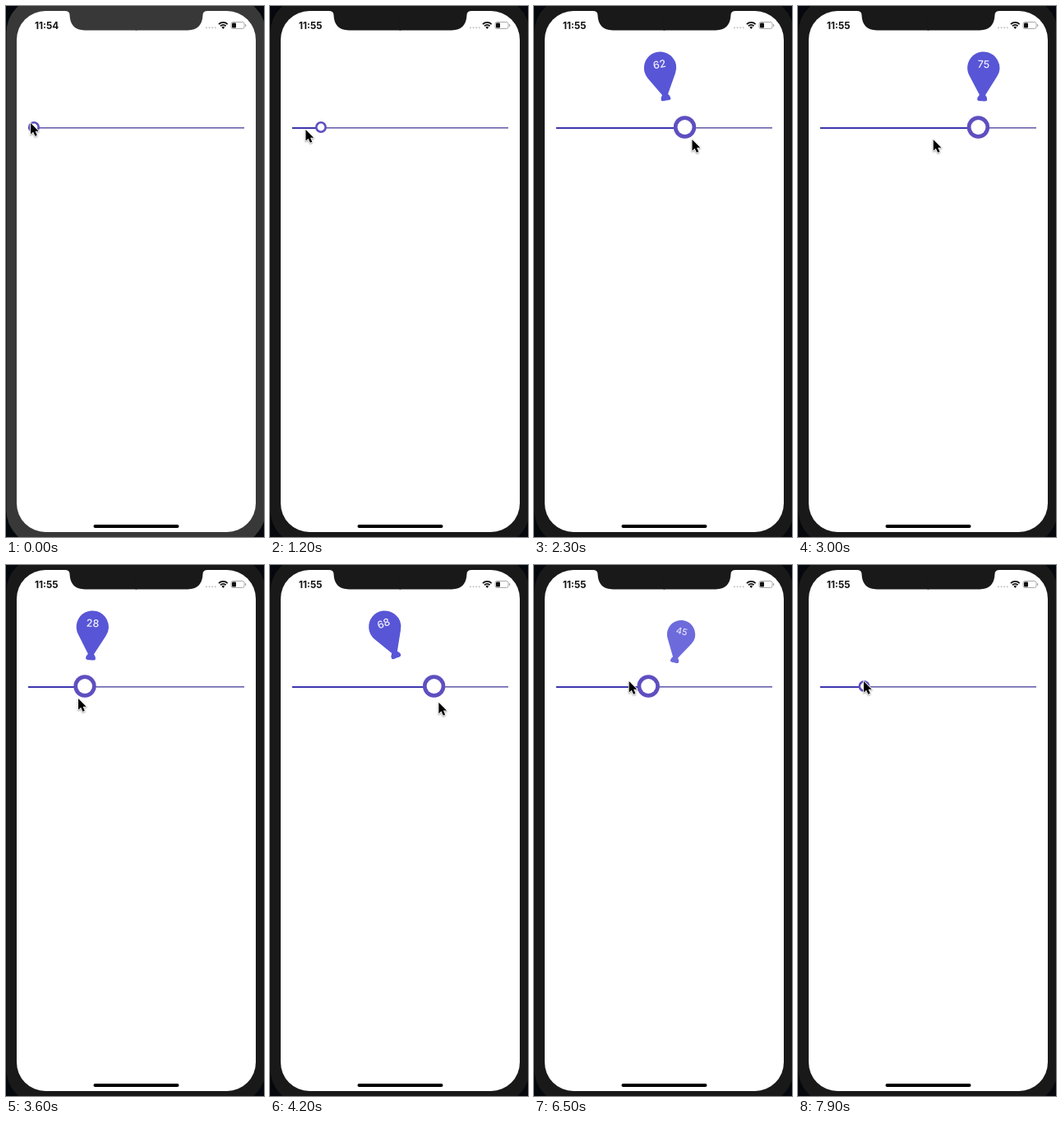
An HTML page with a canvas for the animation above (8 s loop, 314 by 644 pixels).

```html
<!DOCTYPE html>
<html lang="en">
<head>
<meta charset="utf-8">
<title>Balloon slider</title>
<style>
  html, body { margin: 0; width: 100%; height: 100%; overflow: hidden; background: #05080c; }
  canvas { display: block; width: 314px; height: 644px; }
</style>
</head>
<body>
<canvas id="stage"></canvas>
<script>
const W = 314, H = 644, LOOP = 8000, STEP = 100;
const TRACK_Y = 147, HEAD_Y = 75;
const INK = '#111';
const canvas = document.getElementById('stage');
const ratio = window.devicePixelRatio || 1;
canvas.width = W * ratio;
canvas.height = H * ratio;
const ctx = canvas.getContext('2d');

function ramp(t, from, to) {
  const u = Math.min(1, Math.max(0, (t - from) / (to - from)));
  return u * u * (3 - 2 * u);
}

const pulse = (t, inA, inB, outA, outB) => ramp(t, inA, inB) * (1 - ramp(t, outA, outB));

// Each move eases from wherever the last one ended: [start, end, target].
const glide = (t, from, ...moves) =>
  moves.reduce((pos, [start, end, to]) => pos + (to - pos) * ramp(t, start, end), from);

const thumbX = t => glide(t, 34,
  [1000, 1200, 62], [1670, 2670, 238], [2830, 3580, 96], [3620, 4340, 211], [6100, 6850, 80.5]);

const balloonX = t => glide(t, 70,
  [1800, 2800, 237], [2850, 3700, 100], [3900, 4650, 213], [6200, 7100, 82]);

const cursorX = t => glide(t, 30,
  [1000, 1200, 43.5], [1470, 2680, 238], [2680, 3330, 88], [3600, 4350, 219],
  [4600, 5900, 208], [6150, 6690, 79], [7000, 7300, 69], [7600, 7800, 80]);

const cursorY = t => glide(t, 142,
  [200, 400, 144.5], [1000, 1200, 150], [1300, 2200, 162], [3600, 4300, 167], [5400, 5900, 141]);

function box(x, y, w, h, r, fill) {
  ctx.beginPath();
  ctx.roundRect(x, y, w, h, r);
  ctx.fillStyle = fill;
  ctx.fill();
}

function disc(x, y, r, fill) {
  ctx.beginPath();
  ctx.arc(x, y, r, 0, Math.PI * 2);
  ctx.fillStyle = fill;
  ctx.fill();
}

function drawPhone(t) {
  const bezel = t < 600 ? '#383838' : t < 700 ? '#282828' : '#191919';
  ctx.fillStyle = '#05080c';
  ctx.fillRect(0, 0, W, H);
  box(0.5, -10, 315.5, 664, 42, bezel);
  box(13, 6, 291, 632, 35, '#fff');

  // Right half of the notch, drawn twice about its centre.
  const half = new Path2D('M-1 -1H87V0Q81 0 81 5C80.5 17 74.5 23.4 62.5 23.4H-1Z');
  ctx.fillStyle = bezel;
  for (const side of [-1, 1]) {
    ctx.save();
    ctx.translate(158.5, 6);
    ctx.scale(side, 1);
    ctx.fill(half);
    ctx.restore();
  }
  box(106.5, 629, 104, 4, 2, '#000');
}

function drawWifi(x, y) {
  const from = -Math.PI * 0.75, to = -Math.PI * 0.25;
  ctx.strokeStyle = ctx.fillStyle = INK;
  ctx.lineWidth = 1.8;
  for (const r of [4.6, 7.6]) {
    ctx.beginPath();
    ctx.arc(x, y, r, from, to);
    ctx.stroke();
  }
  ctx.beginPath();
  ctx.moveTo(x, y + 0.5);
  ctx.arc(x, y, 2.6, from, to);
  ctx.fill();
}

function drawStatus(t) {
  ctx.fillStyle = INK;
  ctx.font = '700 11.7px Inter, sans-serif';
  ctx.textAlign = 'left';
  ctx.fillText(t < 1100 ? '11:54' : '11:55', 35, 27.8);

  for (let i = 0; i < 4; i++) disc(244 + i * 3.6, 26.3, 1.1, '#c9c9c9');
  drawWifi(264.3, 27.5);

  ctx.beginPath();
  ctx.roundRect(274, 19.5, 16, 8, 2.2);
  ctx.strokeStyle = '#a8a8a8';
  ctx.lineWidth = 1;
  ctx.stroke();
  box(275, 20.5, 5, 6, 1, INK);
  box(291, 22, 1.2, 3, 0.6, '#a8a8a8');
}

function drawSlider(x, press) {
  const outer = 7 + 6.7 * press, ring = 2.6 + 2.1 * press;
  ctx.fillStyle = '#6962ac';
  ctx.fillRect(27, 147, 263, 1.6);
  ctx.fillStyle = '#3e38b0';
  ctx.fillRect(27, 147, x - 27, 2);
  disc(x, TRACK_Y, outer, '#5e4fc0');
  disc(x, TRACK_Y, outer - ring, '#fff');
}

// The balloon trails the thumb and tilts by the distance between them.
function drawBalloon(x, lag, scale, value) {
  if (scale < 0.01) return;
  ctx.save();
  ctx.globalAlpha = scale;
  ctx.translate(x, TRACK_Y);
  ctx.scale(scale, scale);
  ctx.translate(0, HEAD_Y - TRACK_Y);
  ctx.rotate(-lag * 0.35 * Math.PI / 180);

  ctx.beginPath();
  ctx.arc(0, 0, 19.6, Math.PI * 0.83, Math.PI * 0.17);
  ctx.lineTo(3.6, 33);
  ctx.quadraticCurveTo(6.4, 36, 6, 39);
  ctx.quadraticCurveTo(5, 41, 0, 40.2);
  ctx.quadraticCurveTo(-5, 41, -6, 39);
  ctx.quadraticCurveTo(-6.4, 36, -3.6, 33);
  ctx.closePath();
  ctx.fillStyle = '#5856d6';
  ctx.fill();

  ctx.fillStyle = '#f2f1ff';
  ctx.font = '500 12.5px Inter, sans-serif';
  ctx.textAlign = 'center';
  ctx.fillText(value, 0, 0);
  ctx.restore();
}

function drawCursor(x, y) {
  const arrow = new Path2D('M0 0V14.2L3.3 11.2L5.7 16.6L8.2 15.5L5.9 10.2H10.2Z');
  ctx.save();
  ctx.translate(x, y);
  ctx.scale(0.95, 0.95);
  ctx.lineJoin = 'round';
  ctx.lineWidth = 1.8;
  ctx.strokeStyle = '#fff';
  ctx.shadowColor = 'rgba(0,0,0,.4)';
  ctx.shadowBlur = 2 * ratio;
  ctx.shadowOffsetY = ratio;
  ctx.stroke(arrow);
  ctx.shadowColor = 'transparent';
  ctx.fillStyle = '#000';
  ctx.fill(arrow);
  ctx.restore();
}

function draw(t) {
  const thumb = thumbX(t), balloon = balloonX(t);
  const press = pulse(t, 1550, 1800, 4750, 5100) + pulse(t, 6150, 6400, 7120, 7450);
  const inflate = pulse(t, 1650, 2050, 4750, 5150) + pulse(t, 6150, 6600, 7050, 7450);
  ctx.setTransform(ratio, 0, 0, ratio, 0, 0);
  drawPhone(t);
  drawStatus(t);
  drawSlider(thumb, press);
  drawBalloon(balloon, thumb - balloon, inflate, Math.round((thumb - 23.5) / 2.6));
  drawCursor(cursorX(t), cursorY(t));
}

const start = performance.now();
function tick() {
  const t = (performance.now() - start) % LOOP;
  draw(Math.floor(t / STEP) * STEP);
  requestAnimationFrame(tick);
}
tick();
</script>
</body>
</html>
```
